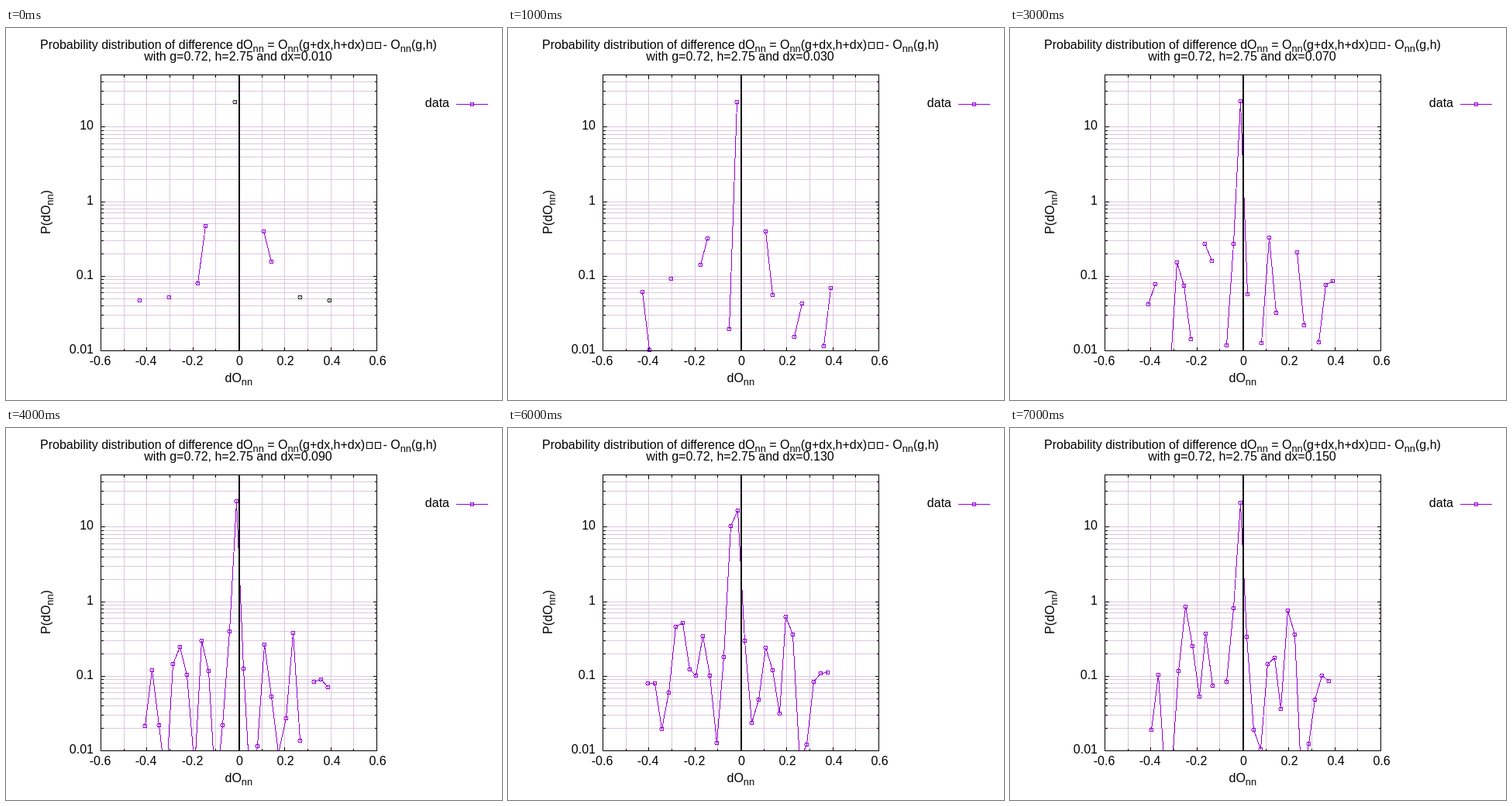
Write an HTML page that moves like this. It is 640 px wide and 480 px high and loops after 8000 ms.

```html
<!DOCTYPE html>
<html lang="en">
<head>
<meta charset="utf-8">
<title>Probability distribution</title>
<style>
  html, body { margin: 0; width: 100%; height: 100%; overflow: hidden; background: #fff; }
  svg { display: block; }
  text { font: 16px "Liberation Sans", Arial, sans-serif; fill: #000; white-space: pre; }
  .sub { font-size: 12.8px; }
  .mid { text-anchor: middle; }
  .end { text-anchor: end; }
  path, rect, circle { fill: none; stroke-width: 1; shape-rendering: crispEdges; }
  .grid { stroke: #dcc8dc; }
  .axis { stroke: #000; }
  .data { stroke: #9400d3; }
  .dark { stroke: #202020; }
</style>
</head>
<body>
<svg width="640" height="480" viewBox="0 0 640 480">
  <clipPath id="plot"><rect x="122" y="60" width="357" height="357"/></clipPath>
  <text x="44" y="27">Probability distribution of difference dO<tspan class="sub" dy="4">nn</tspan><tspan dy="-4"> = O</tspan><tspan class="sub" dy="4">nn</tspan><tspan dy="-4">(g+dx,h+dx)</tspan></text>
  <path class="axis" d="M465.5 18.5h7v8h-7zM476.5 18.5h7v8h-7z"/>
  <text x="486.5" y="27">- O<tspan class="sub" dy="4">nn</tspan><tspan dy="-4">(g,h)</tspan></text>
  <text id="step" class="mid" x="299.5" y="42"></text>
  <text x="282.5" y="457">dO<tspan class="sub" dy="4">nn</tspan></text>
  <text transform="translate(57 266) rotate(-90)">P(dO<tspan class="sub" dy="4">nn</tspan><tspan dy="-4">)</tspan></text>
  <text class="end" x="572" y="102">data</text>
  <path id="grid" class="grid"/>
  <path id="tics" class="axis"/>
  <g id="labels"></g>
  <path id="line" class="data" clip-path="url(#plot)"/>
  <g id="marks"></g>
  <path class="data" d="M581 98.5h41"/>
  <g id="key"></g>
  <path class="axis" d="M301 60v356" style="stroke-width:2"/>
  <rect class="axis" x="122.5" y="60.5" width="356" height="356"/>
</svg>
<script>
const $ = id => document.getElementById(id);
const L = 122.5, R = 478.5, T = 60.5, B = 416.5;
const DECADE = (B - T) / Math.log10(5000);
const snap = v => Math.floor(v) + 0.5;

function drawAxes() {
  let grid = '', tics = '', labels = '';
  const label = (cls, x, y, s) => labels += `<text class="${cls}" x="${x}" y="${y}">${s}</text>`;

  for (let i = 0; i <= 12; i++) {
    const x = snap(L + i * (R - L) / 12), major = i % 2 === 0, len = major ? 5 : 3;
    grid += `M${x} ${T}V${B}`;
    tics += `M${x} ${B}v${-len}M${x} ${T}v${len}`;
    if (major) label('mid', x - (i < 6 ? 1 : -1), 435, +(i / 10 - 0.6).toFixed(1));
  }
  for (let d = 0; d < 4; d++) {
    for (let m = 1; m < 10; m++) {
      const y = snap(B - DECADE * (d + Math.log10(m)));
      if (y < T) break;
      const len = m === 1 ? 5 : 3;
      grid += `M${L} ${y}H${R}`;
      tics += `M${L} ${y}h${len}M${R} ${y}h${-len}`;
      if (m === 1) label('end', 113, y + 3.5, +(10 ** (d - 2)).toFixed(2));
    }
  }
  $('grid').setAttribute('d', grid);
  $('tics').setAttribute('d', tics);
  $('labels').innerHTML = labels;
}

// Each state: first and last bin centre, then bin heights in px (holes are empty bins).
const s10 = { x: [172, 417], dark: [13, 22, 26],
  y: [351,,,, 347,,,, 329, 255,,,, 95,,,, 262, 301,,,, 347,,,, 351] };
const s50 = { x: [177, 416], dark: [12, 25],
  y: [328, 347,, 464, 299, 381,,, 281, 286,, 434, 293, 94, 376,, 402, 261, 387,,, 313, 362,,, 337, 318] };
const s90 = { x: [179, 415],
  y: [384, 312, 383, 459, 304, 282, 318, 440, 274, 313, 470, 383, 262, 94, 310, 470, 410, 279, 346, 419, 374, 264, 403,, 327, 324, 334] };
const s110 = { x: [180, 415],
  y: [388, 307, 394, 421, 308, 260, 311, 398, 270, 325, 490, 349, 254, 95, 313, 436, 360, 285, 342, 398, 288, 267,, 401, 322, 325, 332] };
const s130 = { x: [180, 412],
  y: [329, 329, 388, 341, 256, 251, 311, 319, 268, 319, 406, 295, 126, 106, 274, 380, 350, 283, 312, 368, 243, 266, 430, 408, 327, 316, 315] };
const s150 = { x: [182, 411],
  y: [389, 318, 457, 445, 313, 230, 281, 346, 265, 332,, 327, 232, 96, 269, 389, 414, 304, 296, 362, 235, 266, 465, 407, 350, 319, 326] };

const EMPTY = 483;
function between(a, b, x) {
  const y = Array.from({ length: 27 }, (_, i) => {
    const p = a.y[i], q = b.y[i];
    const v = ((p ?? EMPTY) + (q ?? EMPTY)) / 2;
    return v > B && !(p && q) ? undefined : Math.round(v);
  });
  return { x, y };
}

const states = [s10, between(s10, s50, [173, 416]), s50, between(s50, s90, [178, 416]),
  s90, s110, s130, s150];

const mark = (x, y, cls = 'data') =>
  `<circle class="${cls}" cx="${x}" cy="${y}" r="2.5"/><path class="${cls}" d="M${x - 0.5} ${y}h1"/>`;

function show(n) {
  const { x: [x0, x1], y: ys, dark = [] } = states[n];
  let line = '', marks = '', pen = 'M';
  for (let i = 0; i < 27; i++) {
    if (ys[i] === undefined) { pen = 'M'; continue; }
    const x = Math.round(x0 + i * (x1 - x0) / 26) + 0.5, y = ys[i] + 0.5;
    line += `${pen}${x} ${y}`;
    pen = 'L';
    if (y <= B) marks += mark(x, y, dark.includes(i) ? 'dark' : 'data');
  }
  $('line').setAttribute('d', line);
  $('marks').innerHTML = marks;
  $('step').textContent = `with g=0.72, h=2.75 and dx=${(0.01 + 0.02 * n).toFixed(3)}`;
}

drawAxes();
$('key').innerHTML = mark(601.5, 98.5);

let shown = -1;
const start = performance.now();
function tick() {
  const n = Math.floor((performance.now() - start) / 1000) % states.length;
  if (n !== shown) show(shown = n);
  requestAnimationFrame(tick);
}
tick();
</script>
</body>
</html>
```
